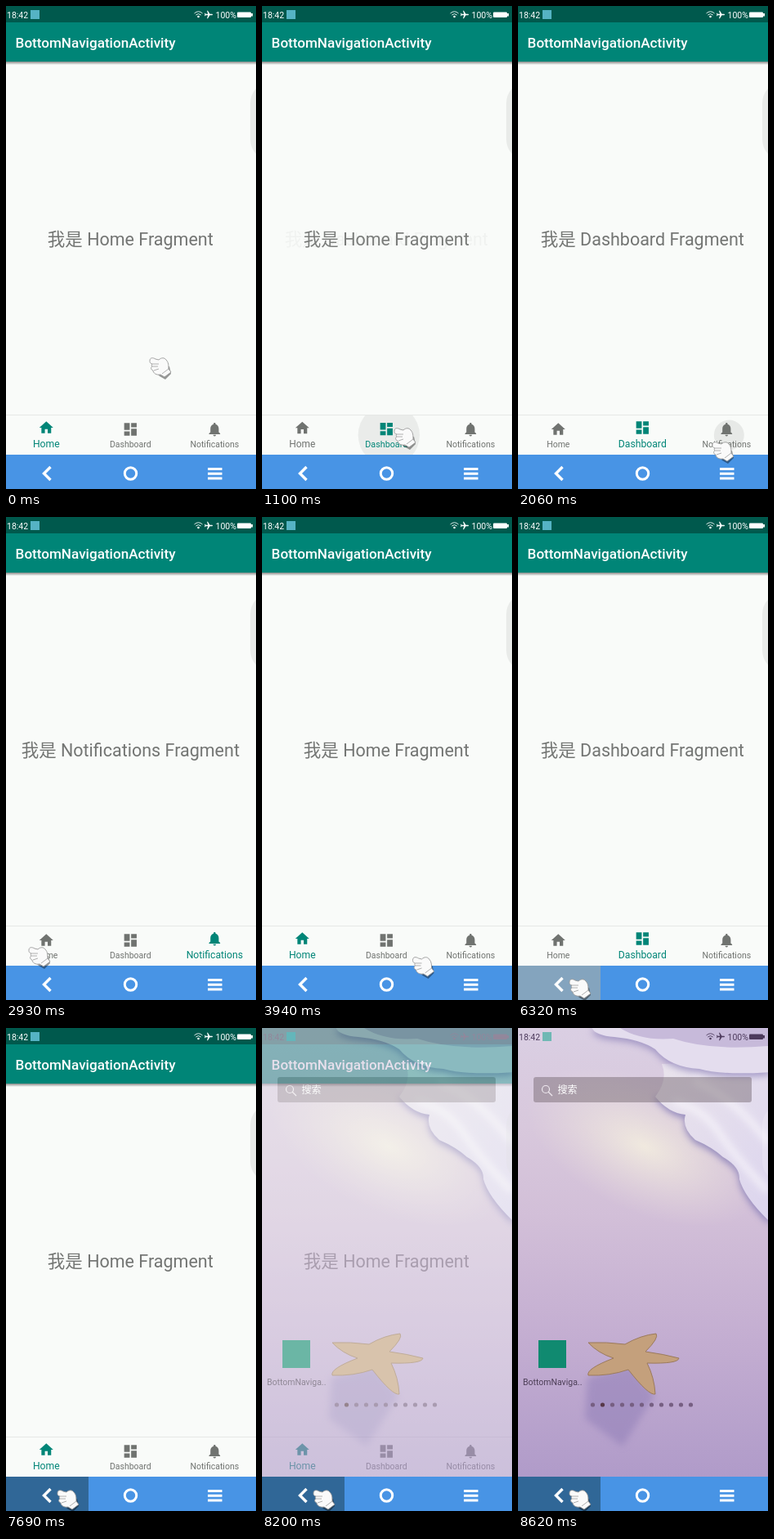
Recreate the animation shown at these times as an HTML page. Size 306 px wide and 591 px high, loop 9080 ms.

```html
<!DOCTYPE html>
<html lang="zh">
<head>
<meta charset="utf-8">
<title>Bottom navigation</title>
<style>
  html, body { margin: 0; width: 100%; height: 100%; overflow: hidden; }
  svg { display: block; width: 100vw; height: 100vh; font-family: Roboto, "Noto Sans CJK SC", "Noto Sans CJK", sans-serif; }
  .page { font-size: 21.5px; fill: #737573; text-anchor: middle; }
  .tab text { text-anchor: middle; }
  .line { fill: none; stroke: #fff; stroke-width: 3.4; }
</style>
</head>
<body>
<svg viewBox="0 0 306 591" preserveAspectRatio="none">
  <defs>
    <linearGradient id="sand" x2="0" y2="1">
      <stop offset="0" stop-color="#dacfe3"/>
      <stop offset=".22" stop-color="#d8c8dc"/>
      <stop offset=".42" stop-color="#d2bfd8"/>
      <stop offset=".7" stop-color="#c3add1"/>
      <stop offset="1" stop-color="#b09bc9"/>
    </linearGradient>
    <radialGradient id="glow">
      <stop offset="0" stop-color="#f3eddf" stop-opacity=".9"/>
      <stop offset="1" stop-color="#eae0dc" stop-opacity="0"/>
    </radialGradient>
    <linearGradient id="foam" x2="1" y2="1">
      <stop offset="0" stop-color="#eae4ec"/>
      <stop offset="1" stop-color="#dcd5ee"/>
    </linearGradient>
    <linearGradient id="drop" x2="0" y2="1">
      <stop offset="0" stop-opacity=".45"/>
      <stop offset="1" stop-opacity="0"/>
    </linearGradient>
    <filter id="soft" x="-50%" y="-50%" width="200%" height="200%"><feGaussianBlur stdDeviation="4"/></filter>
    <clipPath id="tabClip"><rect y="501" width="306" height="48"/></clipPath>
    <g id="status">
      <text x="1" y="14.5" font-size="10.5">18:42</text>
      <path d="M230.5 9Q235.5 4.5 240.5 9M232.3 11Q235.5 8.200 238.700 11" fill="none" stroke="currentColor" opacity=".85"/>
      <circle cx="235.5" cy="13" r="1.300"/>
      <path transform="translate(248 10.5) rotate(90) scale(.5) translate(-11.5 -12)" d="M21 16v-2l-8-5V3.5c0-.83-.67-1.5-1.5-1.5S10 2.670 10 3.5V9l-8 5v2l8-2.5V19l-2 1.5V22l3.5-1 3.5 1v-1.5L13 19v-5.5z"/>
      <text x="256.5" y="14.5" font-size="10.5">100%</text>
      <rect x="283" y="7.500" width="17" height="6.500" rx="1"/>
      <rect x="300" y="9" width="2" height="3.5"/>
    </g>
  </defs>

  <g id="launcher">
    <rect width="306" height="549" fill="url(#sand)"/>
    <ellipse cx="155" cy="145" rx="155" ry="80" fill="url(#glow)" transform="rotate(25 155 145)"/>
    <path d="M166 84Q184 108 205 110Q200 126 217 141Q238 150 251 162Q272 174 271 189Q277 211 308 241V90Z" fill="#8078b4" filter="url(#soft)" opacity=".8"/>
    <path d="M168 84Q184 104 205 106Q200 122 217 137Q238 146 251 158Q272 170 271 185Q277 207 308 237V40L176 44Q184 64 168 84Z" fill="url(#foam)"/>
    <path d="M90 2Q92 13 118 15Q150 18 168 30Q186 52 222 54Q250 62 308 58V-2Z" fill="#8a7fb8" filter="url(#soft)" opacity=".7"/>
    <path d="M90-2Q92 9 118 11Q150 14 168 26Q186 48 222 50Q250 58 308 54V-2Z" fill="#e4ddee"/>
    <path d="M125 0Q150 16 190 13Q235 28 306 22V0Z" fill="#b4a3cd" opacity=".6"/>
    <path d="M190 90Q226 98 246 128T306 200M215 65Q265 85 306 140" fill="none" stroke="#f8f5fb" stroke-width="9" opacity=".7" filter="url(#soft)"/>
    <path d="M85 428L140 412 167 450 128 512 82 478Z" fill="#917fb8" opacity=".55" filter="url(#soft)"/>
    <path d="M86 385Q108 384 131 387Q150 376 169 374Q173 379 156 396Q178 399 197 404Q196 411 158 410Q167 428 168 448Q160 450 135 418Q112 426 86 425Q83 417 117 404Q98 398 86 385Z" fill="#c4a07c" stroke="#9b7a5c"/>
    <use href="#status" fill="#4d3b5c" color="#4d3b5c"/>
    <rect x="30" y="5" width="11" height="11" fill="#6fb8b4"/>
    <rect x="19" y="60" width="267" height="31" rx="3" fill="#6e6168" opacity=".45"/>
    <g fill="none" stroke="#eee8ee" stroke-width="1.2"><circle cx="34" cy="75" r="4.5"/><path d="M37 78l5 5"/></g>
    <text x="48.5" y="80" font-size="12" fill="#fff">搜索</text>
    <rect x="25" y="382" width="34" height="34" fill="#108a70"/>
    <text x="6" y="437" font-size="10.5" fill="#4d3f57">BottomNaviga..</text>
    <g id="dots" fill="#765f82"></g>
    <path d="M306 101q-7 8-7 18v44q0 10 7 18z" fill="#fff" opacity=".2"/>
  </g>

  <g id="app">
    <rect width="306" height="549" fill="#f9fbf9"/>
    <rect width="306" height="20" fill="#00594d"/>
    <rect y="20" width="306" height="48" fill="#008577"/>
    <rect y="68" width="306" height="4" fill="url(#drop)"/>
    <use href="#status" fill="#fff" color="#fff"/>
    <rect x="30" y="5" width="11" height="11" fill="#55b3c4"/>
    <text x="11.6" y="51" font-size="17.1" font-weight="500" fill="#fff">BottomNavigationActivity</text>
    <path d="M306 101q-7 8-7 18v44q0 10 7 18z" fill="#e9ebe9"/>
    <g id="pages"></g>
    <rect y="500" width="306" height="1" fill="#e6e8e6"/>
    <circle id="ripple" cy="525" clip-path="url(#tabClip)"/>
    <g id="tabs"></g>
  </g>

  <rect y="549" width="306" height="42" fill="#4894e5"/>
  <rect id="back" y="549" width="101" height="42"/>
  <path class="line" d="M54.5 564L46.5 572L54.5 580"/>
  <circle class="line" cx="152.5" cy="572" r="7.2" style="stroke-width:3"/>
  <path class="line" style="stroke-width:3" d="M247 566.5h17.5M247 572.3h17.5M247 578h17.5"/>

  <g id="cursor">
    <path d="M-8 2L12-2 14 7 7 14 0 10Z" fill="#000" opacity=".4" transform="translate(0 1)"/>
    <path d="M-12-8C-12-12-8-12-5-10L-1-9C2-12 6-12 8-9C11-6 11-2 11 2L14 6 6 12 1 9C-4 10-8 7-8 4C-11 3-11 0-9-1C-10-2-10-3-9-4C-12-5-12-6-12-8Z" fill="#fafafa" stroke="#999" stroke-width=".9"/>
    <path d="M-9-4L-1-4M-9-1L-2-1M-7 4L-1 2M3 8L11 2" fill="none" stroke="#b0b0b0"/>
  </g>
</svg>
<script>
const LOOP = 9080, FADE = 200, RESIZE = 115;
const $ = id => document.getElementById(id);
const clamp = v => Math.max(0, Math.min(1, v));
const mix = (a, b, p) => a + (b - a) * p;
const progress = (time, start, length) => clamp((time - start) / length);
const ease = p => (1 - Math.cos(Math.PI * p)) / 2;

const tabs = [
  ["Home", "M10 20v-6h4v6h5v-8h3L12 3 2 12h3v8z"],
  ["Dashboard", "M3 13h8V3H3v10zm0 8h8v-6H3v6zm10 0h8V11h-8v10zm0-18v6h8V3h-8z"],
  ["Notifications", "M12 22c1.1 0 2-.9 2-2h-4c0 1.1.89 2 2 2zm6-6v-5c0-3.07-1.64-5.64-4.5-6.32V4c0-.83-.67-1.5-1.5-1.5s-1.5.67-1.5 1.5v.68C7.63 5.36 6 7.92 6 11v5l-2 2v1h16v-1l-2-2z"]
].map(([name, icon], i) => ({ name, icon, x: 49.3 + 103 * i }));

// tab, time of selection, time of touch (none for the back key)
const selections = [
  { tab: 0, at: -1000 },
  { tab: 1, at: 1070, touch: 960 },
  { tab: 2, at: 2100, touch: 2010 },
  { tab: 0, at: 3270, touch: 3180 },
  { tab: 1, at: 4900, touch: 4830 },
  { tab: 0, at: 6600 }
];

// start, end, x, y of each cursor move
const moves = [
  [170, 390, 181, 511], [550, 640, 174, 528], [1280, 1580, 250, 545], [2310, 2650, 40, 538],
  [3550, 4070, 223, 552], [4190, 4320, 176, 541], [5200, 5700, 75, 577]
];

$("pages").innerHTML = tabs.map(t => `<text class="page" x="152.3" y="293">我是 ${t.name} Fragment</text>`).join("");
$("tabs").innerHTML = tabs.map(t => `<g class="tab"><path d="${t.icon}"/><text x="${t.x}" y="540.2">${t.name}</text></g>`).join("");
$("dots").innerHTML = Array.from({ length: 11 }, (_, i) =>
  `<circle cx="${91.5 + 12 * i}" cy="461" r="2.6"${i === 1 ? ' fill="#573848"' : ""}/>`).join("");
const pages = [...$("pages").children], tabNodes = [...$("tabs").children];

function drawTabs(time) {
  const index = selections.findLastIndex(s => time >= s.at);
  const now = selections[index], before = selections[index - 1];
  const fade = ease(progress(time, now.at, FADE)), grow = ease(progress(time, now.at, RESIZE));
  tabs.forEach((tab, i) => {
    const active = i === now.tab, leaving = before && i === before.tab;
    const size = active ? grow : leaving ? 1 - grow : 0;
    const [icon, label] = tabNodes[i].children;
    pages[i].setAttribute("opacity", active ? fade : leaving ? 1 - fade : 0);
    tabNodes[i].setAttribute("fill", active ? "#008577" : "#707370");
    icon.setAttribute("transform", `translate(${tab.x - 10.2} ${mix(507.8, 505.8, size)}) scale(.85)`);
    label.setAttribute("font-size", mix(10.5, 12.2, size));
  });
}

function drawRipple(time) {
  const hit = selections.findLast(s => s.touch <= time);
  const alpha = hit ? .07 * (1 - progress(time, hit.at, FADE)) : 0;
  $("ripple").setAttribute("opacity", alpha);
  if (!alpha) return;
  $("ripple").setAttribute("cx", tabs[hit.tab].x + 3);
  $("ripple").setAttribute("r", Math.min(56, 37.5 * ((time - hit.touch) / 140) ** .7));
}

function drawCursor(time) {
  let x = 188, y = 442;
  for (const [start, end, toX, toY] of moves) {
    const p = ease(progress(time, start, end - start));
    x = mix(x, toX, p);
    y = mix(y, toY, p);
  }
  $("cursor").setAttribute("transform", `translate(${x} ${y})`);
  const pressed = time >= 6320 && time < 6420 || time >= 7560 && time < 7690;
  $("back").setAttribute("fill", x < 101 && y > 549 ? pressed ? "#84a4be" : "#306797" : "none");
}

function draw() {
  const time = performance.now() % LOOP;
  drawTabs(time);
  drawRipple(time);
  drawCursor(time);
  $("app").setAttribute("opacity", (1 - progress(time, 8050, 560)) ** 3);
  requestAnimationFrame(draw);
}
draw();
</script>
</body>
</html>
```
